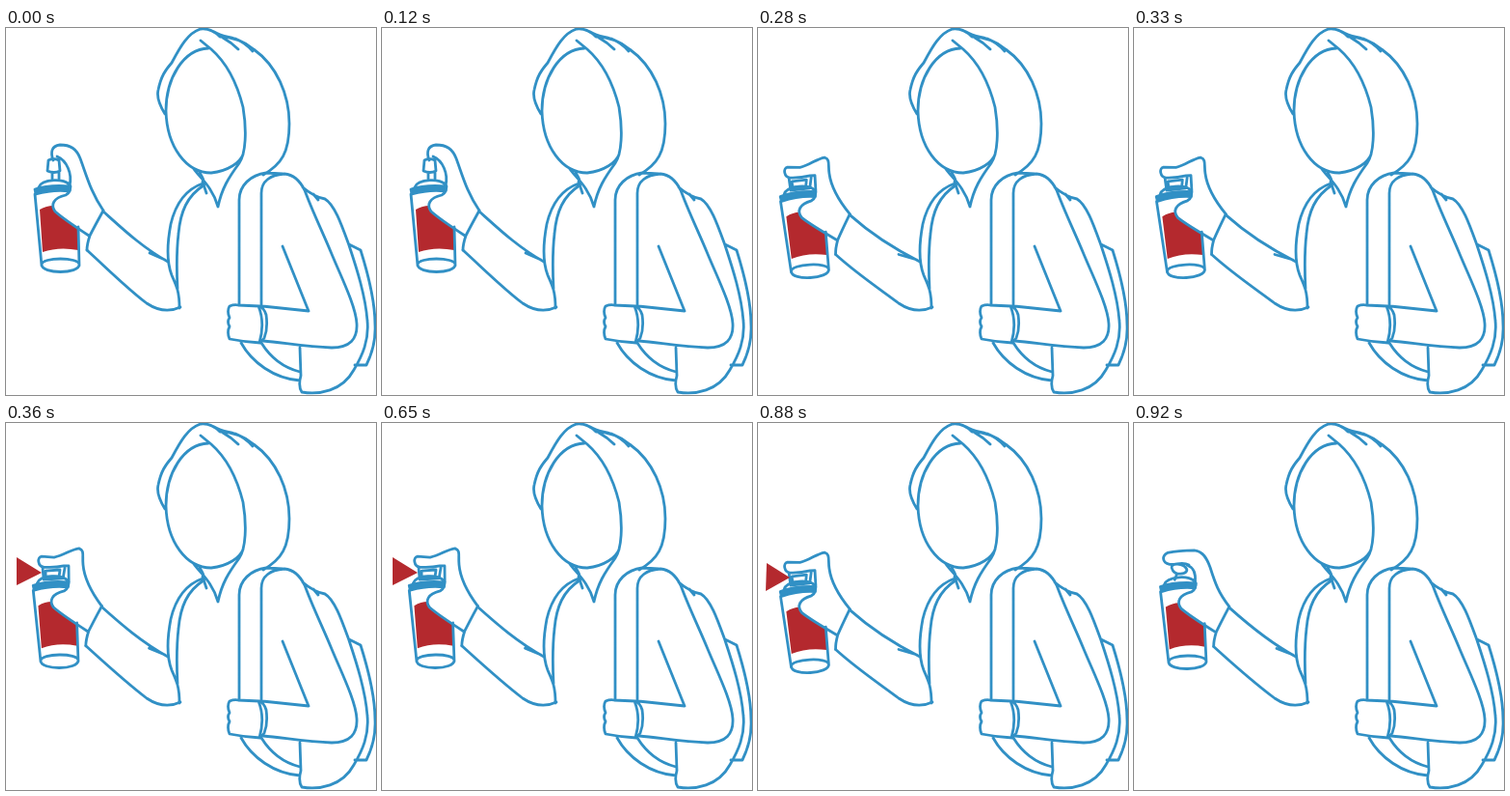
An HTML page with a canvas that plays this animation: 384x380 px, repeating every 960 ms.

```html
<!DOCTYPE html>
<html lang="en">
<head>
<meta charset="utf-8">
<style>
html, body { margin: 0; width: 100%; height: 100%; overflow: hidden; background: #fff; }
canvas { display: block; }
</style>
</head>
<body>
<canvas id="stage" width="384" height="380"></canvas>
<script>
const ctx = document.getElementById('stage').getContext('2d');
const BLUE = '#3190c5', RED = '#b4292e', LOOP = 960;
const path = (...parts) => new Path2D(parts.join(' '));

const body = path(
  // hood
  'M165 89 C160 81 156 72 158 64 C161 50 165 44 172 36 C181 19 189 5 202 1 C211 0 217 4 222 9',
  'C234 9 247 14 257 22 C281 39 294 69 294 99 C294 129 286 141 267 152',
  'M216 4 C224 9 231 9 237 11 M225 10 Q234 15 241 22 M238 11 Q248 15 256 24',
  // face
  'M210 21 C184 22 166 52 166 86 C167 123 187 150 213 150 C231 148 243 139 246 131',
  'M202 13 L213 22 C229 36 240 58 246 82 C250 106 249 130 242 140 C231 155 224 166 220 185',
  // collar
  'M195 146 C201 155 214 164 220 185 M201 150 Q207 158 205 164 M204 159 L208 171',
  // front edges
  'M204 161 C187 167 176 182 171 203 C167 224 167 243 172 256 C177 267 180 273 180 290',
  'M205 163 C188 174 181 190 179 213 C177 230 177 250 178 270',
  // strap
  'M242 286 L242 178 C242 163 254 152 270 150 L287 151',
  'M265 288 L265 171 C265 158 275 152 289 151 C300 152 306 160 310 168',
  // right arm
  'C318 190 329 212 338 234 C348 258 363 288 364 306 C365 322 357 331 338 331 C312 330 289 326 267 324',
  'M287 226 L314 293 L266 288',
  // cuff
  'M232 288 Q237 286 241 287 L263 288 Q268 290 270 297 Q272 311 268 321 L264 326 Q247 325 232 322 Q229 315 232 309 Q229 304 232 300 Q229 293 232 288 Z',
  'M262 288 Q269 305 263 326',
  // pack and jacket hem
  'M244 326 C255 346 278 363 305 365 M265 326 C275 342 289 352 305 356',
  'M305 331 L306 360 Q303 371 307 377 C325 380 349 376 361 354 C370 339 377 323 375 303',
  'C373 277 364 249 356 225 C348 203 341 183 331 177 Q320 175 308 165 M319 172 L324 178',
  'M356 224 L368 230 C374 249 383 279 383 307 C384 325 379 339 374 349 L362 349'
);

const can = path(
  'M30 172 Q33 205 37 246 M75 206 L76 246',
  'M37 245 C37 237 76 237 76 245 C76 255 37 255 37 245 Z',
  'M34 165 C37 156 62 155 66 163'
);
const ring = path('M30 167 Q45 162 67 164 L66 169 Q49 167 31 172 Z');
const label = path('M35 188 Q42 184 49 184 Q50 191 60 197 L75 207 L75 230 Q55 226 38 232 Z');
const palm = path('M66 162 Q68 170 62 173 C49 176 46 183 51 190 Q60 198 86 215 M101 189 Q91 207 87 215 Q84 224 84 230');

const fingers = {
  raised: path(
    'M49 137 C46 129 47 122 56 121 C67 121 73 125 77 135 C84 154 88 170 101 189',
    'M53 133 C63 137 69 151 66 163',
    'M44 137 Q49 134 55 137 L56 148 Q50 151 43 148 Z M48 150 L48 156 M55 150 L55 156'),
  bent: path(
    'M60 145 C53 141 47 145 40 144 C32 142 32 135 38 132 Q49 130 66 130 C75 131 79 139 82 148 C87 165 90 174 101 189',
    'M58 145 Q68 149 66 163',
    'M43 150 C39 144 48 142 55 146 C61 151 56 154 51 154 Q45 154 43 150 Z M47 155 L45 160'),
  pressed: path(
    'M41 148 C35 147 34 138 39 137 L52 138 C63 136 69 130 78 129 C84 131 81 137 82 146 C83 159 90 174 101 189',
    'M41 148 Q52 149 62 147 L67 147 M67 147 L67 163',
    'M40 149 L41 161 L61 160 L63 149 M43 152 L58 151 L57 158 L43 158 Z')
};

// x, y is the foot of the can; turn is in radians
const rest = { x: 57, y: 246, turn: 0, hand: 'raised' };
const half = { x: 56, y: 248, turn: -0.02, hand: 'bent' };
const low = { x: 54.5, y: 252, turn: -0.055, hand: 'pressed' };
const aim = { x: 56, y: 247, turn: -0.01, hand: 'pressed' };

const steps = [
  { until: 200, pose: rest },
  { until: 280, pose: half },
  { until: 360, pose: low },
  { until: 840, pose: aim, spray: [11, 139, 11, 168, 37, 155] },
  { until: 880, pose: low, spray: [9, 146, 9, 174, 33, 161] },
  { until: 920, pose: low, spray: [9, 145, 8, 174, 33, 160] },
  { until: LOOP, pose: half }
];

function moved(pose, x, y) {
  const c = Math.cos(pose.turn), s = Math.sin(pose.turn);
  const dx = x - rest.x, dy = y - rest.y;
  return [pose.x + dx * c - dy * s, pose.y + dx * s + dy * c];
}

function sleeve(pose) {
  const [tx, ty] = moved(pose, 101, 190);
  const [bx, by] = moved(pose, 84, 230);
  const drop = pose.y - rest.y;
  ctx.beginPath();
  ctx.moveTo(tx, ty);
  ctx.bezierCurveTo(tx + 19, ty + 17, 141, 227 + drop / 4, 168, 242);
  ctx.moveTo(149 - drop / 2, 233 + drop / 4);
  ctx.lineTo(165, 240);
  ctx.moveTo(bx, by);
  ctx.bezierCurveTo(bx + 22, by + 20, 126, 270, 146, 285);
  ctx.quadraticCurveTo(164, 297, 181, 289);
  ctx.stroke();
}

function arm(pose) {
  sleeve(pose);
  ctx.save();
  ctx.translate(pose.x, pose.y);
  ctx.rotate(pose.turn);
  ctx.translate(-rest.x, -rest.y);
  ctx.fillStyle = RED;
  ctx.fill(label);
  ctx.fillStyle = BLUE;
  ctx.fill(ring);
  for (const p of [can, ring, palm, fingers[pose.hand]]) ctx.stroke(p);
  ctx.restore();
}

function spray([ax, ay, bx, by, cx, cy]) {
  ctx.fillStyle = RED;
  ctx.beginPath();
  ctx.moveTo(ax, ay);
  ctx.lineTo(bx, by);
  ctx.lineTo(cx, cy);
  ctx.fill();
}

function draw(t) {
  const step = steps.find(s => t < s.until);
  ctx.fillStyle = '#fff';
  ctx.fillRect(0, 0, 384, 380);
  ctx.strokeStyle = BLUE;
  ctx.lineWidth = 2.8;
  ctx.lineCap = ctx.lineJoin = 'round';
  ctx.stroke(body);
  arm(step.pose);
  if (step.spray) spray(step.spray);
}

const start = performance.now();
function tick() {
  draw((performance.now() - start) % LOOP);
  requestAnimationFrame(tick);
}
tick();
</script>
</body>
</html>
```
